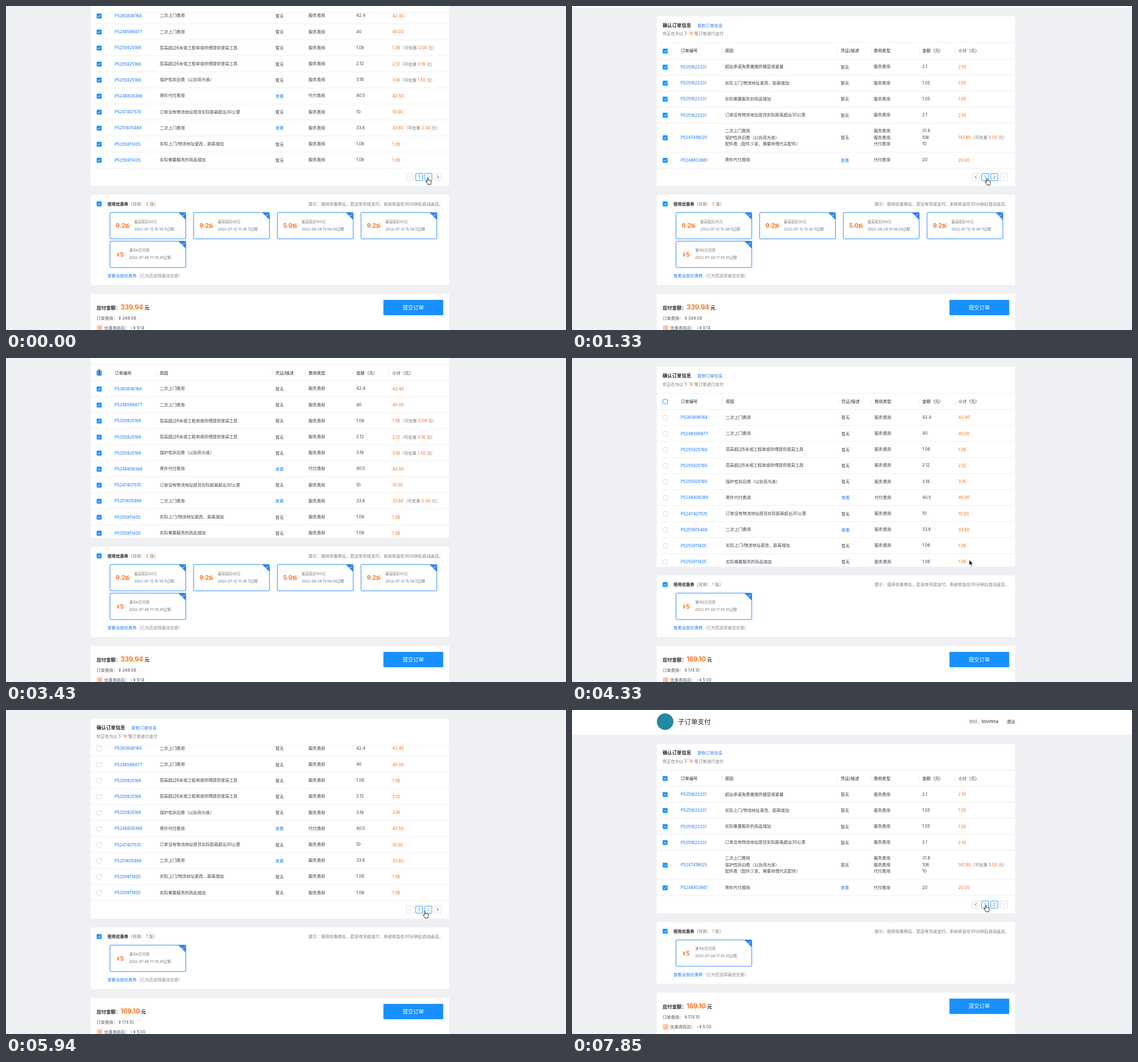
Animation, 983 px wide and 570 px high, one loop 8 s. Source, as an HTML page:

```html
<!DOCTYPE html>
<html lang="zh-CN">
<head>
<meta charset="utf-8">
<title>子订单支付</title>
<style>
html, body { margin: 0; width: 100%; height: 100%; overflow: hidden; background: #eff0f4; }
#stage { display: block; width: 983px; height: 570px; }
text { font-family: Inter, "Noto Sans CJK SC", "Noto Sans CJK", sans-serif; }
.num { letter-spacing: -.015em; }
</style>
</head>
<body>
<svg id="stage" viewBox="0 0 983 570">
  <g id="page"></g>
  <g id="cursor"></g>
</svg>
<script>
const LOOP = 8000;
const BLUE = '#1890ff', LINK = '#1a7cf5', ORANGE = '#fa6b16';
const INK = '#404040', DARK = '#262626', GREY = '#777', LINE = '#ebecef';
const BODY = 7.34, SMALL = 6.3, LARGE = 8.4;
const LEFT = 148.8, WIDTH = 629.2, GAP = 15.7;
const ROW = 28.2, HEAD = 28.3, VIEW = 304.5, MAX_SCROLL = 37;

// id, reason, has voucher, paid on behalf, amount, discount
const PAGE_ONE = [
  ['P5260846164', '二次上门费用', 0, 0, '42.4'],
  ['P5248598877', '二次上门费用', 0, 0, '40'],
  ['P5255925168', '层高超过6米或工程单或师傅提供登高工具', 0, 0, '1.06', '0.08'],
  ['P5255925168', '层高超过6米或工程单或师傅提供登高工具', 0, 0, '2.12', '0.16'],
  ['P5255925168', '保护性拆旧费（以协商为准）', 0, 0, '3.18', '1.50'],
  ['P5248808366', '寄件代付费用', 1, 1, '40.5'],
  ['P5247407570', '订单没有物流地址提货实际距离超出30公里', 0, 0, '10'],
  ['P5251605489', '二次上门费用', 1, 0, '33.6', '2.40'],
  ['P5255911405', '实际上门/物流地址更改，距离增加', 0, 0, '1.06'],
  ['P5255911405', '实际需要服务的商品增加', 0, 0, '1.06']
];
const PAGE_TWO = [
  ['P5251622331', '超出承诺免费搬楼的楼层或重量', 0, 0, '2.1'],
  ['P5251622331', '实际上门/物流地址更改，距离增加', 0, 0, '1.05'],
  ['P5251622331', '实际需要服务的商品增加', 0, 0, '1.05'],
  ['P5251622331', '订单没有物流地址提货实际距离超出30公里', 0, 0, '2.1'],
  ['P5247418625', '二次上门费用|保护性拆旧费（以协商为准）|配件费（配件少发，需要师傅代买配件）',
    0, '0|0|1', '31.8|106|10', '5.00'],
  ['P5248803661', '寄件代付费用', 1, 1, '20']
];

const clamp = v => Math.max(0, Math.min(1, v));
const lerp = (a, b, p) => a + (b - a) * p;
const ease = p => p * p * (3 - 2 * p);

// Progress in n nearly equal hops, the first at time a and the last at time b
const hops = (t, a, b, n) =>
  t < a ? 0 : clamp(Math.floor((t - a) / (b - a) * (n - 1) + 1.1) / n);

const rect = (x, y, w, h, fill, extra = '') =>
  `<rect x="${x}" y="${y}" width="${w}" height="${h}" fill="${fill}" ${extra}/>`;
const path = (d, stroke, width = 1, fill = 'none') =>
  `<path d="${d}" stroke="${stroke}" stroke-width="${width}" fill="${fill}"/>`;
const span = (s, fill, extra = '') => `<tspan fill="${fill}" ${extra}>${s}</tspan>`;
const orange = s => span(s, ORANGE);
const move = (x, y, s) => `<g transform="translate(${x} ${y})">${s}</g>`;

// Text centred vertically on y
const text = (x, y, s, fill = INK, size = BODY, extra = '') =>
  `<text x="${x}" y="${y + size * .37}" font-size="${size}" fill="${fill}" ${extra}>${s}</text>`;

const bold = 'font-weight="600"', medium = 'font-weight="500"', num = 'class="num"';

function checkbox(y, checked, border = '#d9d9d9') {
  const x = 163.5;
  if (!checked) return rect(x - 3.9, y - 3.9, 7.8, 7.8, '#fff', `rx=".8" stroke="${border}" stroke-width=".9"`);
  return rect(x - 4.3, y - 4.3, 8.6, 8.6, BLUE, 'rx="1"') +
    path(`M${x - 2.2} ${y}l1.6 1.7 2.9-3.3`, '#fff', 1);
}

function tableHead(s, dx) {
  const y = HEAD / 2;
  const cols = [[191, '订单编号'], [270 - dx, '原因'], [473 - dx, '凭证/描述'],
    [531 - dx, '费用类型'], [615, '金额（元）'], [678.3, '小计（元）']];
  const bars = [264.7 - dx, 467.3 - dx, 525.7 - dx, 609.3, 672.7];
  return checkbox(y + .3, s.checked, BLUE) +
    cols.map(c => text(c[0], y - .2, c[1], DARK, BODY, medium)).join('') +
    bars.map(x => rect(x - .4, y - 5.8, .8, 11.6, '#e6e7ea')).join('') +
    rect(LEFT, HEAD - .5, WIDTH, .8, LINE);
}

function tableRow(r, y, h, s, dx, hover) {
  const [id, reason, voucher, type, amount, discount] = r;
  const mid = y + h / 2;
  const lines = (x, list) => list.map((v, i) =>
    text(x, mid - .6 + (i - (list.length - 1) / 2) * 11.5, v)).join('');
  const amounts = amount.split('|');
  const sum = amounts.reduce((a, v) => a + +v, 0).toFixed(2);
  const note = discount && s.checked ? `（可优惠 ${orange(discount)} 元）` : '';
  return (hover ? rect(LEFT, y, WIDTH, h, '#f3f7fe') : '') +
    checkbox(mid + .3, s.checked) +
    text(190.7, mid, id, LINK, BODY, num) +
    lines(270 - dx, reason.split('|')) +
    text(473 - dx, mid, voucher ? '查看' : '暂无', voucher ? LINK : INK) +
    lines(531 - dx, String(type).split('|').map(v => +v ? '代付费用' : '服务费用')) +
    lines(614.7, amounts) +
    text(678, mid, orange(sum) + note, GREY) +
    rect(LEFT, y + h - .5, WIDTH, .8, LINE);
}

function pager(y, s) {
  const box = (x, color, body) =>
    rect(x - 6.2, y - 6.2, 12.4, 12.4, '#fff', `rx="1" stroke="${color}" stroke-width=".9"`) + body;
  const arrow = (x, dir, on) =>
    box(x, '#dcdcdc', path(`M${x - dir * 1.3} ${y - 2.7}l${dir * 2.7} 2.7 ${-dir * 2.7} 2.7`, on ? '#333' : '#ccc', .9));
  const digit = (x, n) => {
    const active = s.page === n, hover = s.hover === n;
    const color = hover ? '#5cb0ff' : active ? BLUE : INK;
    return box(x, active || hover ? BLUE : '#d9d9d9',
      text(x, y, n, color, BODY, 'text-anchor="middle" ' + medium));
  };
  return arrow(709, -1, s.page === 2) + digit(725.3, 1) + digit(741.4, 2) + arrow(757.8, 1, s.page === 1);
}

function table(s) {
  const dx = s.page === 2 ? 1.3 : 0;
  let y = HEAD, out = tableHead(s, dx);
  (s.page === 1 ? PAGE_ONE : PAGE_TWO).forEach((r, i) => {
    const h = r[1].includes('|') ? 51.3 : ROW;
    out += tableRow(r, y, h, s, dx, s.rowHover === i);
    y += h;
  });
  return out + pager(y + 15.6, s);
}

function coupon(i, y, offer) {
  const x = 182.5 + (i % 4) * 146.9, w = 133.1, h = 46.4;
  const [value, rule, date] = offer;
  const cash = value[0] === '¥';
  const label = cash
    ? span('¥', ORANGE, `font-size="${LARGE}"`) + span(value.slice(1), ORANGE, 'dx="1.3"')
    : value + span('折', ORANGE, `font-size="${LARGE}"`);
  const tx = x + (cash ? 33.6 : 42.7), ty = y + (cash ? 15.5 : 16.6);
  return rect(x, y, w, h, '#fff', `rx="1.5" stroke="${LINK}" stroke-width=".9"`) +
    path(`M${x + w - 13} ${y}h13v13z`, 'none', 0, '#2a82f5') +
    path(`M${x + w - 7} ${y + 4.2}l2 2.1 3.6-3.9`, '#fff', .8) +
    text(x + (cash ? 12 : 10.3), y + 23.2, label, ORANGE, 10.8, bold + ' ' + num) +
    text(tx, ty, rule, GREY, SMALL) +
    text(tx, ty + 13.1, date + '过期', GREY, SMALL, 'letter-spacing="-.02em"');
}

function couponCard(s, h) {
  const nine = ['9.2', '最高抵扣30元', '2022-07-12 15:38:11'];
  const cash = ['¥5', '满100元可用', '2022-07-06 17:35:35'];
  const offers = s.few ? [cash]
    : [nine, nine, ['5.0', '最高抵扣100元', '2022-09-28 15:06:04'], nine, cash];
  return rect(LEFT, 0, WIDTH, h, '#fff') + checkbox(16, true) +
    text(178, 16, span('使用优惠券', DARK, bold) + `（可用： ${orange(offers.length)} 张）`, '#666') +
    text(531, 15.7, '提示：使用优惠券后，若没有完成支付，系统将会在30分钟后自动返还。', GREY) +
    offers.map((o, i) => coupon(i, 31.2 + Math.floor(i / 4) * 50.4, o)).join('') +
    text(178, h - 16, span('查看全部优惠券', LINK, medium) + '（已为您选择最佳优惠）', '#888');
}

function orderCard(s) {
  const [total, fee, off] = s.few ? ['169.10', '174.10', '5.00'] : ['339.94', '349.08', '9.14'];
  return rect(LEFT, 0, WIDTH, 120, '#fff') +
    text(159, 24.8, '应付金额：' + span(total, ORANGE, 'font-size="11.8" letter-spacing="-.02em"') +
      span('元', DARK, 'dx="2.6"'), DARK, LARGE, bold) +
    text(159, 43.3, `订单费用： ¥ ${fee}`, '#555') +
    rect(160.4, 56.2, 8.2, 8.2, '#fff1e8', `rx="1" stroke="${ORANGE}" stroke-width=".7"`) +
    text(164.5, 60.3, '惠', ORANGE, 5.6, 'text-anchor="middle"') +
    text(172.5, 60.3, `优惠券抵扣： −¥ ${off}`, '#555') +
    rect(662.5, 10.5, 105, 27, BLUE, 'rx="1"') +
    text(715, 23.8, '提交订单', '#fff', 9.4, 'text-anchor="middle" ' + medium);
}

function topBar() {
  return rect(0, 0, 983, 43.8, '#fff') +
    '<circle cx="163.5" cy="20.5" r="14.5" fill="#2389a0"/>' +
    text(186, 20.8, '子订单支付', DARK, 11.5, medium) +
    text(697, 20.5, '你好，' + span('tolvinma', DARK), '#666') +
    text(763.3, 20.5, '退出', DARK);
}

function scrollbar(s, top) {
  if (!s.bar) return '';
  return rect(771.5, top + 1.3 + s.scroll / MAX_SCROLL * 33, 5.2, 268, '#7d7d7d', `rx="2.4" opacity="${s.bar}"`);
}

function scene(s) {
  const cardTop = 59.4, tableTop = 106;
  const view = s.page === 1 ? VIEW : 251.6;
  const couponTop = tableTop + view + GAP;
  const couponH = s.few ? 108.2 : 158.6;
  const orderTop = couponTop + couponH + GAP;
  const y = -Math.max(0, orderTop - 506.4);
  return move(0, y, topBar() +
    rect(LEFT, cardTop, WIDTH, tableTop - cardTop + view, '#fff') +
    text(159, cardTop + 15.6, '确认订单信息', DARK, LARGE, bold) +
    text(220.3, cardTop + 15.8, '复制订单信息', LINK, BODY, medium) +
    text(159, cardTop + 30.4, `你正在为以下 ${orange('16')} 笔订单进行支付`, GREY) +
    `<svg x="0" y="${tableTop}" width="983" height="${view}">${move(0, -s.scroll, table(s))}</svg>` +
    rect(LEFT, tableTop - .5, WIDTH, .8, LINE) +
    scrollbar(s, tableTop) +
    move(0, couponTop, couponCard(s, couponH)) +
    move(0, orderTop, orderCard(s)));
}

const CURSORS = {
  hand: path('M-1 1.2a1 1 0 0 1 2 0V4.5q1.3-.8 1.9.2 1.2-.6 1.8.4 1.4-.4 1.5 1V8.5q0 1-.8 2.1V12H.2V11Q-1.6 9.3-3 7.2c-.5-.9.6-1.6 1.3-.9l.7.8z', '#111', .9, '#fff'),
  arrow: path('M0 0V9.6L2.2 7.6 3.8 11.3 5.4 10.6 3.8 7H6.7Z', '#fff', .7, '#000'),
  beam: ['#fff', '#111'].map((c, i) =>
    path('M-2-5.2Q0-5 0-3.6 0-5 2-5.2M0-3.6V3.6M-2 5.2Q0 5 0 3.6 0 5 2 5.2M-1.2 1H1.2', c, 2 - i)).join('')
};

// start, end, hops, x, y reached
const MOVES = [
  [890, 1330, 4, 728.4, 303],
  [2080, 2840, 6, 163, 23.5],
  [2990, 3140, 2, 163.5, 25.5],
  [3730, 4330, 5, 697.2, 355],
  [4470, 5050, 5, 692, 349.3],
  [5490, 5940, 4, 735.3, 354],
  [6090, 6230, 2, 739.5, 354.3],
  [7260, 7850, 5, 726.3, 343]
];

function cursorAt(t) {
  let x = 740.2, y = 302;
  for (const [a, b, n, tx, ty] of MOVES) {
    const p = ease(hops(t, a, b, n));
    x = lerp(x, tx, p);
    y = lerp(y, ty, p);
  }
  let kind = 'arrow';
  if (t < 2080 || (t >= 5940 && t < 6670) || t >= 7560) kind = 'hand';
  else if (t >= 3140 && t < 3730) kind = 'beam';
  return { x, y, kind };
}

function stateAt(t, cur) {
  const page = t < 450 || (t >= 1930 && t < 6520) ? 1 : 2;
  const few = t >= 3580;
  let hover = 0;
  if (cur.kind === 'hand') {
    if (page === 1 && (t < 450 || t >= 5940)) hover = 2;
    if (page === 2 && cur.x < 732) hover = 1;
  }
  let scroll = 0;
  if (page === 1) scroll = t < 450 ? MAX_SCROLL : MAX_SCROLL * Math.pow(hops(t, 4620, 5200, 5), 1.22);
  return {
    page, few, hover, scroll,
    checked: page === 2 || !few,
    rowHover: t >= 4620 && t < 5200 ? 9 : -1,
    bar: t < 4620 || t >= 5640 ? 0 : t < 5490 ? 1 : .5
  };
}

const pageEl = document.getElementById('page');
const cursorEl = document.getElementById('cursor');
let lastKey = '';

function draw(t) {
  const cur = cursorAt(t), state = stateAt(t, cur);
  const key = JSON.stringify(state);
  if (key !== lastKey) pageEl.innerHTML = scene(state);
  lastKey = key;
  cursorEl.innerHTML = move(cur.x, cur.y, CURSORS[cur.kind]);
}

const begin = performance.now();
function tick() {
  draw((performance.now() - begin) % LOOP);
  requestAnimationFrame(tick);
}
tick();
</script>
</body>
</html>
```
